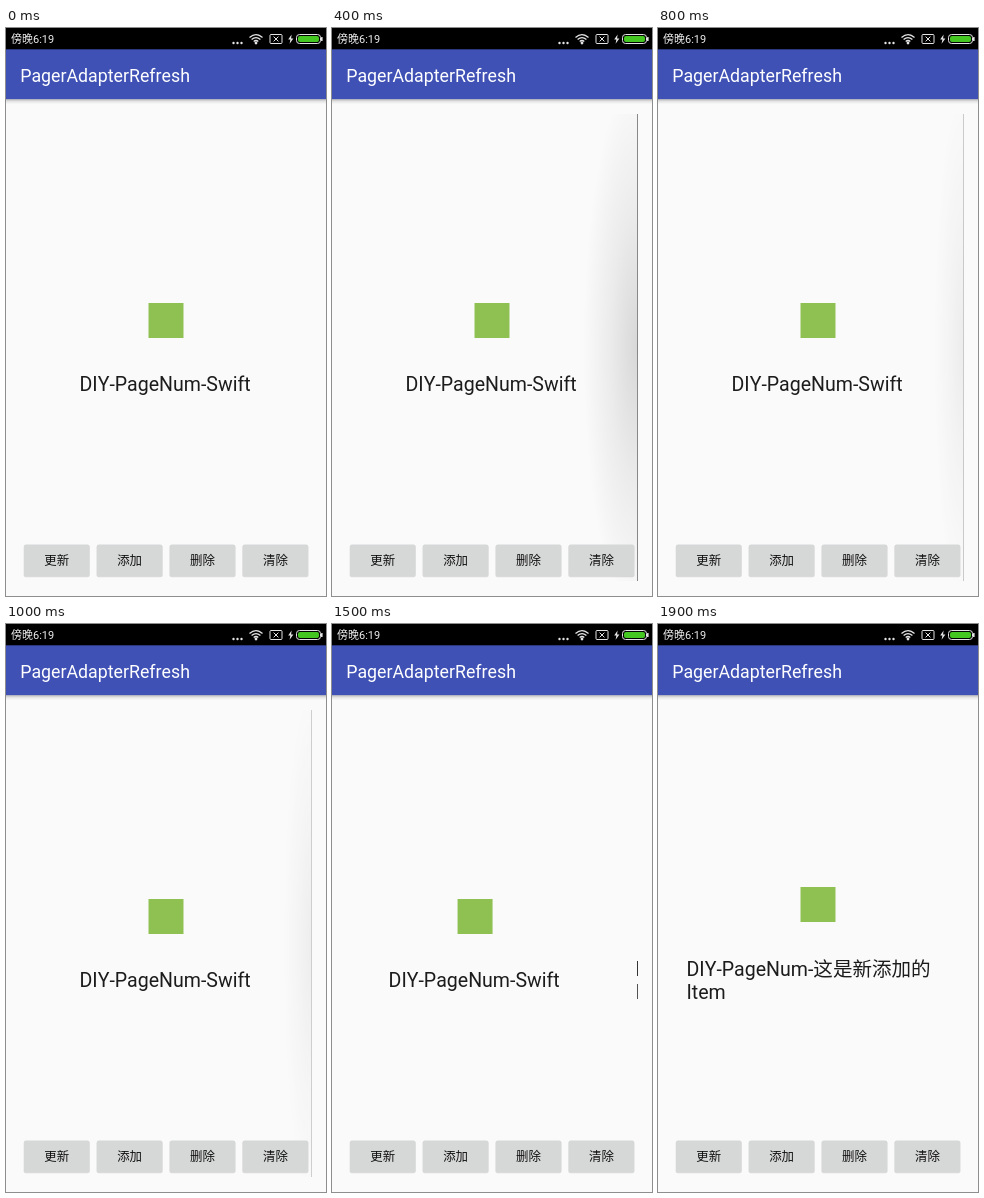
An HTML page for the animation above (2 s loop, 320 px wide and 568 px high).

```html
<!DOCTYPE html>
<html lang="zh">
<head>
<meta charset="utf-8">
<title>PagerAdapterRefresh</title>
<style>
  html, body { margin: 0; width: 100%; height: 100%; overflow: hidden; background: #fafafb; }
  svg { display: block; width: 320px; height: 568px; }
  text { font-family: Roboto, "Noto Sans CJK SC", "Noto Sans CJK", sans-serif; font-kerning: none; }
  .page text { font-size: 19.56px; fill: #1c1c1c; }
  .btn text { font-size: 12.44px; fill: #111; text-anchor: middle; }
</style>
</head>
<body>
<svg viewBox="0 0 320 568">
  <defs>
    <clipPath id="pager"><rect x="14" y="86" width="292" height="467"/></clipPath>
    <linearGradient id="drop" x2="0" y2="1">
      <stop stop-color="#000" stop-opacity=".3"/>
      <stop offset=".4" stop-color="#000" stop-opacity=".1"/>
      <stop offset="1" stop-color="#000" stop-opacity="0"/>
    </linearGradient>
    <radialGradient id="shade">
      <stop stop-color="#000" stop-opacity=".14"/>
      <stop offset=".5" stop-color="#000" stop-opacity=".06"/>
      <stop offset="1" stop-color="#000" stop-opacity="0"/>
    </radialGradient>
  </defs>

  <rect width="320" height="568" fill="#fafafb"/>

  <g clip-path="url(#pager)">
    <g id="pages" class="page">
      <rect x="142.5" y="275" width="35" height="35" fill="#8fc052"/>
      <text x="73.5" y="363">DIY-PageNum-Swift</text>
      <g transform="translate(292 0)">
        <rect x="142.5" y="263" width="35" height="35" fill="#8fc052"/>
        <text x="28.5" y="351.5">DIY-PageNum-这是新添加的</text>
        <text x="28.5" y="374.5">Item</text>
      </g>
    </g>
    <g id="edge">
      <ellipse id="glow" cx="306" cy="320" ry="270" fill="url(#shade)"/>
      <rect x="305" y="86" width="1" height="467" fill="#888"/>
    </g>
  </g>

  <g id="buttons"></g>

  <rect y="71.1" width="320" height="5" fill="url(#drop)"/>
  <rect y="21" width="320" height="50.1" fill="#3f51b5"/>
  <text x="14.2" y="54" font-size="17.78" fill="#fff">PagerAdapterRefresh</text>

  <rect width="320" height="21.3" fill="#000"/>
  <text x="5" y="15" font-size="11" fill="#eee">傍晚6:19</text>
  <g fill="#e4e4e4">
    <circle cx="227.5" cy="15" r="1.2"/>
    <circle cx="231.5" cy="15" r="1.2"/>
    <circle cx="235.5" cy="15" r="1.2"/>
    <circle cx="250" cy="15" r="1.4"/>
    <path d="M285.6 6.5l-3.4 5.1h2.2l-.8 4.2 3.8-5.4h-2.3z"/>
    <rect x="315" y="9" width="1.6" height="4" rx=".5"/>
  </g>
  <g fill="none" stroke="#e4e4e4" stroke-width="1.3">
    <path d="M243.5 9.5q6.5-5.8 13 0M245.6 11.6q4.4-3.9 8.8 0M247.7 13.5q2.3-2 4.6 0"/>
    <rect x="264" y="6.5" width="12" height="9" rx="1" stroke-width="1"/>
    <path d="M267.6 8.6l4.8 4.8m0-4.8l-4.8 4.8" stroke-width="1"/>
    <rect x="290.5" y="6.5" width="24" height="9" rx="3" stroke-width="1"/>
  </g>
  <rect x="292" y="8" width="21" height="6" rx="2" fill="#45c722"/>
</svg>
<script>
  const LOOP = 2000, STEP = 100, PAGE = 292, DRAG = 88;
  const $ = id => document.getElementById(id);

  // Strength of the overscroll glow: [time, value]
  const PULL = [[0, 0], [400, 1], [600, .45], [1000, .38], [1200, 0], [LOOP, 0]];

  $("buttons").innerHTML = ["更新", "添加", "删除", "清除"].map((label, i) => `
    <g class="btn" transform="translate(${18 + i * 72.9} 516.5)">
      <rect x="-.3" y=".5" width="66" height="32.2" rx="2" fill="#000" opacity=".13"/>
      <rect width="65.4" height="31.6" rx="1.8" fill="#d6d7d7"/>
      <text x="32.7" y="20.7">${label}</text>
    </g>`).join("");

  function sample(keys, t) {
    const i = keys.findIndex(k => k[0] > t);
    const [t0, a] = keys[i - 1], [t1, b] = keys[i];
    return a + (b - a) * (t - t0) / (t1 - t0);
  }

  // A finger drag, then the pager settles on the next page
  function scrollAt(t) {
    if (t < 1400) return 0;
    if (t < 1700) return DRAG * ((t - 1400) / 300) ** 1.5;
    const left = Math.max(0, 1 - (t - 1700) / 200);
    return PAGE - (PAGE - DRAG) * left ** 2;
  }

  function draw(t) {
    const pull = sample(PULL, t);
    $("pages").setAttribute("transform", `translate(${-scrollAt(t)} 0)`);
    $("edge").setAttribute("opacity", pull);
    $("glow").setAttribute("rx", 15 + 40 * pull);
  }

  const start = performance.now();
  function tick() {
    const t = (performance.now() - start) % LOOP;
    draw(Math.floor(t / STEP) * STEP);
    requestAnimationFrame(tick);
  }
  tick();
</script>
</body>
</html>
```
